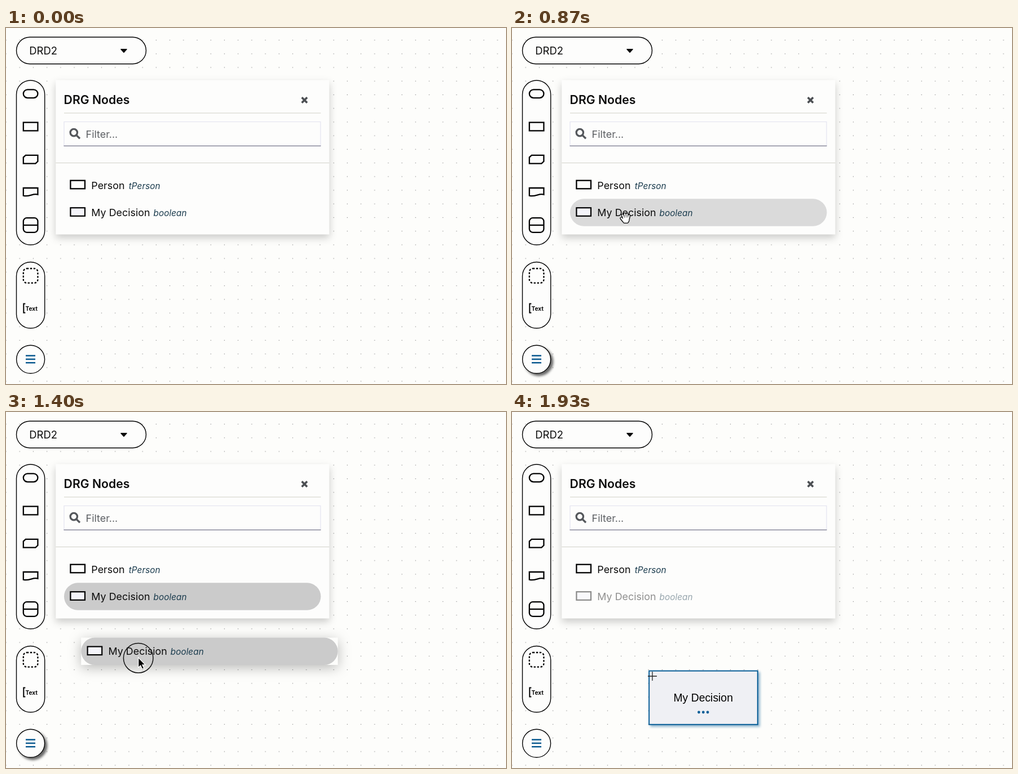
These frames come from a looping animation (887x632 px, 2000 ms). An HTML page:

```html
<!DOCTYPE html>
<html lang="en">
<head>
<meta charset="utf-8">
<title>DRG nodes drag and drop</title>
<style>
  html, body { margin: 0; width: 100%; height: 100%; overflow: hidden; background: #fdfdfb; }
  svg { display: block; width: 887px; height: 632px; font: 17.9px Inter, "Open Sans", sans-serif; fill: #0c0c0c; }
  .line { fill: none; stroke: #000; stroke-width: 2.3; }
  .box { fill: #fdfdfc; stroke: #000; stroke-width: 1.4; }
  .type { font-size: 15.4px; font-style: italic; fill: #1b3c4e; }
  .panel { filter: drop-shadow(0 6px 7px #0003); }
  .lifted { filter: drop-shadow(4px 4px 2px #333b); }
  .ghost { filter: drop-shadow(0 5px 11px #0004); }
  .node { filter: drop-shadow(3px 3px 2px #0a5f9877); }
  .hand { stroke-linecap: round; stroke-linejoin: round; }
</style>
</head>
<body>
<svg viewBox="0 0 887 632">
  <defs>
    <pattern id="grid" width="24.22" height="24.22" patternUnits="userSpaceOnUse" x="-12.11" y="9.5">
      <circle cx="12.11" cy="12.11" r=".75" fill="#8c8c8c"/>
    </pattern>
    <g id="decision">
      <rect x="114.4" y="319.2" width="25.6" height="14.6" fill="#f4f4fa" stroke="#000" stroke-width="2.2"/>
      <text x="151.3" y="334">My Decision</text>
      <text class="type" x="261.5" y="334">boolean</text>
    </g>
    <path id="openHand" d="M-5 -5L-3 1M-1.2 -7L-.3 0M2.6 -6.5L2.6 0M6.3 -4L5 2M-7.5 .5L-4 5M-3 1H5L4.6 5L3 7.5H-2L-4.5 4Z"/>
    <path id="closedHand" d="M-3.8 -3L-3 1M-.7 -4L-.3 0M2.3 -3.8V0M5.2 -2.5L4.8 2M-5 1.5L-4 4M-3 1H4.5V4L3 6.5H-1.5L-4 4Z"/>
  </defs>

  <rect width="887" height="632" fill="#fdfdfb"/>
  <rect width="887" height="632" fill="url(#grid)"/>

  <rect class="box" x="18.5" y="16.3" width="230" height="47.4" rx="23.7"/>
  <text x="41.3" y="46.6" font-size="18.4">DRD2</text>
  <path d="M204 37.8H214L209 43.2Z" stroke="#0c0c0c" stroke-width="1.6" stroke-linejoin="round"/>

  <rect class="box" x="18.5" y="93" width="50.2" height="292" rx="25.1"/>
  <rect class="box" x="18.5" y="415.5" width="50.2" height="117.5" rx="25.1"/>
  <g class="line">
    <rect x="30.8" y="109.3" width="25.6" height="14.8" rx="7.4"/>
    <rect x="30.8" y="167.6" width="25.6" height="14.8"/>
    <path d="M34.8 225.8H56.4V236.8L52.4 240.6H30.8V229.6Z"/>
    <path d="M30.8 284H56.4V295.6C48 292.8 41 300.5 30.8 297.6Z"/>
    <rect x="30.8" y="337.2" width="25.6" height="25.6" rx="6"/>
    <path d="M30.8 350H56.4"/>
    <rect x="30.8" y="427" width="25.6" height="25.6" rx="6" stroke-dasharray="3.4 2.6"/>
    <path d="M34.3 489.6H31.3V505.6H34.3" stroke-width="2"/>
  </g>
  <text x="34.4" y="502" font-size="10.2" font-weight="700">Text</text>

  <circle id="menu" class="box" cx="43.6" cy="588.2" r="25"/>
  <path d="M35 581.8H52M35 588H52M35 594.2H52" stroke="#08598f" stroke-width="2.5"/>

  <rect class="panel" x="88.3" y="92.5" width="485.2" height="274" fill="#fdfdfc"/>
  <text x="102.6" y="135.4" font-size="21.2" font-weight="600">DRG Nodes</text>
  <path d="M524.8 123.3L534.2 132.7M534.2 123.3L524.8 132.7" stroke="#4b4e52" stroke-width="3.6"/>
  <path d="M103 151H558.5M88.3 239.5H573.5" stroke="#d2d2c8" stroke-width="1.2"/>
  <rect x="103" y="166.5" width="455" height="43" fill="none" stroke="#e4e4f0" stroke-width="1.2"/>
  <path d="M102.5 209.4H558.5" stroke="#77778c" stroke-width="1.2"/>
  <g fill="none" stroke="#55585c" stroke-width="3.3">
    <circle cx="120.3" cy="185.6" r="6.2"/>
    <path d="M124.8 190.2L131 196.2"/>
  </g>
  <text x="141.6" y="194.6" fill="#5c5f63">Filter...</text>

  <rect class="line" x="114.4" y="270.7" width="25.6" height="14.6"/>
  <text x="151.3" y="285.6">Person</text>
  <text class="type" x="217.8" y="285.6">tPerson</text>

  <rect id="row" x="103" y="303.3" width="455.5" height="48.4" rx="24.2"/>
  <use id="item" href="#decision"/>

  <g id="node">
    <rect class="node" x="243.2" y="459.6" width="192.6" height="95.2" fill="#eff0f4" stroke="#0a5f98" stroke-width="2"/>
    <text x="339.2" y="513.6" text-anchor="middle" style="font: 19.36px 'Liberation Sans', Arial, sans-serif" fill="#000">My Decision</text>
    <g fill="#0a5f98">
      <circle cx="331.5" cy="533" r="2.4"/><circle cx="339.3" cy="533" r="2.4"/><circle cx="347.1" cy="533" r="2.4"/>
    </g>
  </g>

  <g id="ghost" class="ghost">
    <rect x="103" y="303.3" width="455.5" height="48.4" fill="#fdfdfb"/>
    <rect x="103" y="303.3" width="455.5" height="48.4" rx="24.2" fill="#cbcbcb"/>
    <use href="#decision"/>
  </g>

  <g id="cursor">
    <circle id="ring" fill="none" stroke="#111" stroke-width="1.5"/>
    <path id="arrow" d="M0 -1V17L4 13.2L7 19.6L10 18.2L7.2 12H12.5Z" fill="#000" stroke="#fff" stroke-width="1.3"/>
    <g id="open" class="hand">
      <use href="#openHand" fill="#000" stroke="#000" stroke-width="5"/>
      <use href="#openHand" fill="#fff" stroke="#fff" stroke-width="2.5"/>
    </g>
    <g id="closed" class="hand" transform="translate(1 2)">
      <use href="#closedHand" fill="#000" stroke="#000" stroke-width="4.4"/>
      <use href="#closedHand" fill="#fff" stroke="#fff" stroke-width="2.2"/>
    </g>
    <path id="cross" d="M-8 0H8M0 -8V8" stroke="#222" stroke-width="1.3"/>
  </g>
</svg>
<script>
  const $ = id => document.getElementById(id);
  const show = (id, on) => $(id).style.display = on ? '' : 'none';
  const clamp = x => Math.min(1, Math.max(0, x));

  const LOOP = 2000, ENTER = 70, PRESS = 1070, DRAG = 1200, RELEASE = 1535, PLACE = 1735;
  // time, x, y of the pointer
  const path = [
    [70, 150, 470], [330, 206, 346], [600, 203, 333], [1070, 201, 338],
    [1190, 201, 338], [1400, 234.5, 436.3], [1530, 249, 469]
  ];

  function pointer(t) {
    const i = path.findIndex(p => p[0] > t);
    if (i < 0) return path.at(-1).slice(1);
    if (!i) return path[0].slice(1);
    const [a, b] = [path[i - 1], path[i]];
    let k = (t - a[0]) / (b[0] - a[0]);
    // glide to a stop, except while the drag is gathering speed
    k = b[0] === 1400 ? k * (0.6 + 0.4 * k) : k * (2 - k);
    return [a[1] + (b[1] - a[1]) * k, a[2] + (b[2] - a[2]) * k];
  }

  function draw(t) {
    const [x, y] = pointer(t);
    const pressed = t >= PRESS && t < RELEASE;
    const dragging = t >= DRAG && t < RELEASE;
    const placed = t >= PLACE;
    const over = t >= ENTER && y < 352;
    const hand = over && t < PRESS;

    $('cursor').setAttribute('transform', `translate(${x} ${y})`);
    show('cursor', t >= ENTER);
    show('open', hand);
    show('closed', pressed && !dragging);
    show('arrow', dragging || (t < PRESS && !over));
    show('cross', t >= RELEASE);

    show('ring', pressed);
    $('ring').setAttribute('r', 26.3 + 18 * (1 - clamp((t - PRESS) / 150)));

    show('row', (over || t >= PRESS) && !placed);
    $('row').setAttribute('fill', t >= PRESS ? '#cbcbcb' : '#dadada');
    $('item').setAttribute('opacity', placed ? 0.45 : 1);

    show('ghost', dragging);
    $('ghost').setAttribute('transform', `translate(${x - 204.5} ${y - 339.5})`);
    show('node', placed);
    $('menu').classList.toggle('lifted', t >= ENTER && !placed);
  }

  const start = performance.now();
  (function tick() {
    draw((performance.now() - start) % LOOP);
    requestAnimationFrame(tick);
  })();
</script>
</body>
</html>
```
